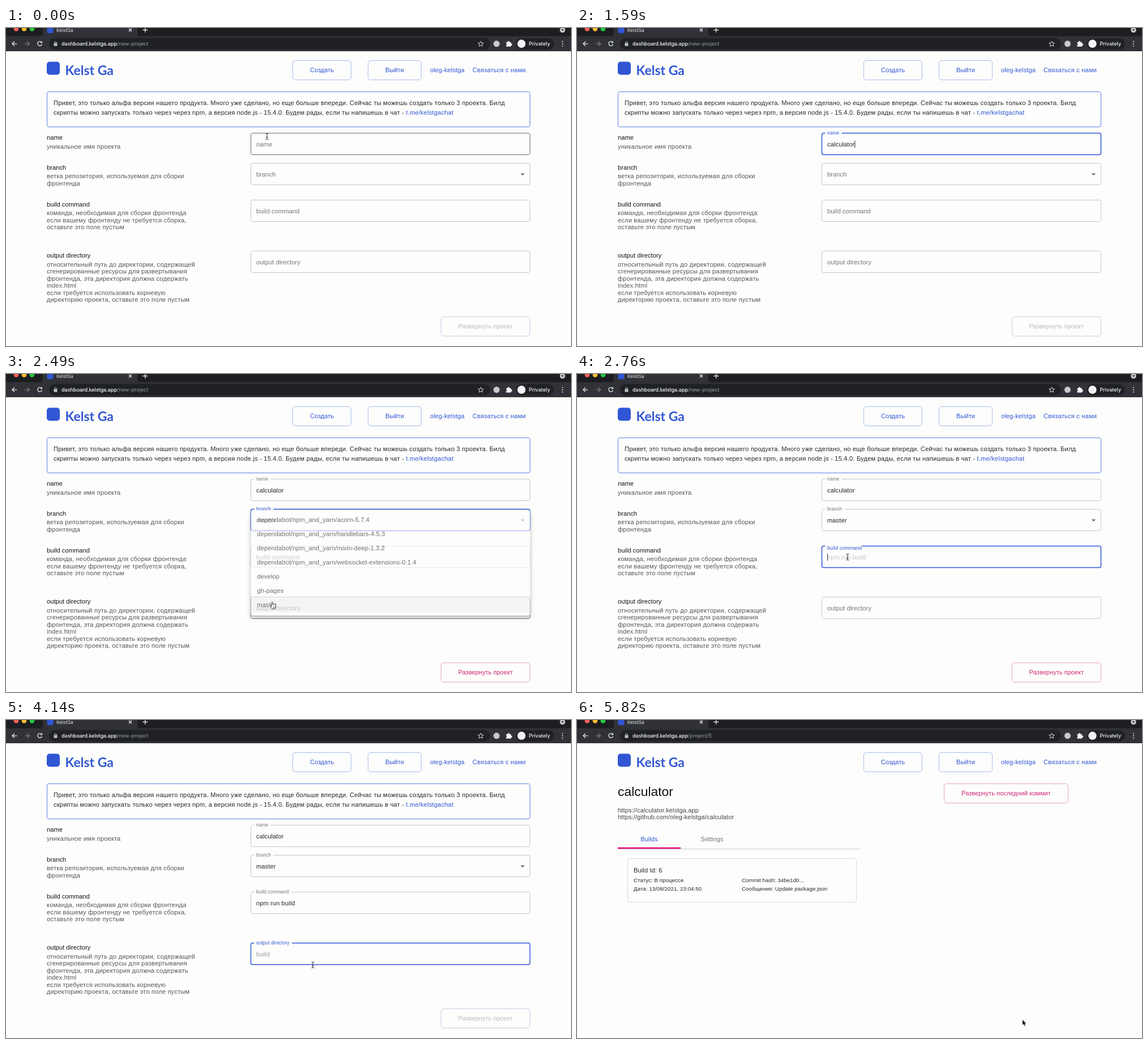
An HTML page for the animation above (5.85 s loop, 998 px wide and 561 px high).

```html
<!DOCTYPE html>
<html lang="ru">
<head>
<meta charset="utf-8">
<title>KelstGa</title>
<style>
  html, body { margin: 0; width: 100%; height: 100%; overflow: hidden; background: #fdfdfc; }
  svg { display: block; width: 998px; height: 561px; }
  text { font-family: "Liberation Sans", Arial, sans-serif; font-size: 11.1px; white-space: pre; }
  .ui { font-family: Inter, Roboto, sans-serif; }
</style>
</head>
<body>
<svg viewBox="0 0 998 561" xmlns="http://www.w3.org/2000/svg">
  <g id="browser"></g>
  <g id="header"></g>
  <g id="page"></g>
  <g id="overlay"></g>
</svg>
<script>
const LOOP = 5850;
const BLUE = '#3156d4', INK = '#262626', GREY = '#757575', PINK = '#cc2a74', BG = '#fdfdfc';
const TAB_BAR = '#1c1e21', TOOLBAR = '#303237', PILL = '#1f2124';
const FOCUS_MS = 100, BLINK = 265;

const $ = id => document.getElementById(id);
const clamp = v => Math.max(0, Math.min(1, v));
const easeOut = v => 1 - (1 - clamp(v)) ** 3;
const easeInOut = v => { v = clamp(v); return v * v * (3 - 2 * v); };
const lerp = (a, b, p) => a + (b - a) * p;

const pen = document.createElement('canvas').getContext('2d');
pen.font = '11.1px "Liberation Sans", Arial, sans-serif';
const widthOf = s => pen.measureText(s).width + s.length * 0.1;

// SVG string helpers
function text(x, y, s, { fill = INK, size = 11.1, gap = 0.1, more = '' } = {}) {
  return `<text x="${x}" y="${y}" fill="${fill}" style="font-size:${size}px;letter-spacing:${gap}px" ${more}>${s}</text>`;
}
function box(x, y, w, h, r, stroke, fill = 'none', width = 1) {
  return `<rect x="${x}" y="${y}" width="${w}" height="${h}" rx="${r}" fill="${fill}" stroke="${stroke}" stroke-width="${width}"/>`;
}
const path = (d, attrs) => `<path d="${d}" ${attrs}/>`;
const dot = (x, y, r, fill) => `<circle cx="${x}" cy="${y}" r="${r}" fill="${fill}"/>`;
function button(x, y, w, label, color, border, fill) {
  return box(x, y, w, 34, 4.5, border, fill) +
    text(x + w / 2, y + 20.6, label, { fill: color, gap: 0, more: 'text-anchor="middle"' });
}

function drawBrowser(address) {
  const ui = { gap: 0, more: 'class="ui"' };
  const line = 'fill="none" stroke="#e8eaed" stroke-width="1.3"';
  return `<rect width="998" height="41" fill="${TOOLBAR}"/>
    <rect width="998" height="14.5" fill="${TAB_BAR}"/>
    <path d="M60 14.5Q65 14.5 65 9V0H232V9Q232 14.5 237 14.5Z" fill="${TOOLBAR}"/>` +
    dot(18, 1.5, 4.3, '#fe5f57') + dot(32, 1.5, 4.3, '#febc2e') + dot(46, 1.5, 4.3, '#28c840') +
    '<rect x="72.5" y="-2" width="11" height="11" rx="2" fill="#3156d4"/>' +
    text(89, 6.6, 'KelstGa', { ...ui, fill: '#e8eaed', size: 8.2 }) +
    path('M217 1l5 5m0-5l-5 5', line) + path('M245.8-1v9m-4.5-4.5h9', line) +
    dot(983, 3.5, 4.8, '#c4c6c9') + path('M980.6 2.3h4.8l-2.4 3z', `fill="${TOOLBAR}"`) +
    `<rect x="76" y="17.5" width="779" height="20.5" rx="10.2" fill="${PILL}"/>
    <rect x="901" y="18" width="67" height="20" rx="10" fill="${PILL}"/>` +
    path('M19.5 27.8h-8.5m4-4l-4 4l4 4', line) +
    path('M33 27.8h8.5m-4-4l4 4l-4 4', line + ' opacity=".4"') +
    path('M62.9 25.2a3.9 3.9 0 1 0 .6 3.5', line) + path('M64 22.8v3.8h-3.8z', 'fill="#e8eaed"') +
    path('M85.5 27h4v-1a2 2 0 0 0-4 0z', 'fill="none" stroke="#bdc1c6"') +
    '<rect x="84.5" y="27" width="6" height="4.8" rx=".6" fill="#bdc1c6"/>' +
    text(98, 31, `<tspan fill="#f1f3f4" stroke="#f1f3f4" stroke-width=".2">dashboard.kelstga.app</tspan>${address}`,
      { ...ui, fill: '#9aa0a6', size: 9.1 }) +
    path('M838.6 23.2l1.4 3.1l3.4.3l-2.6 2.3l.8 3.3l-3-1.8l-3 1.8l.8-3.3l-2.6-2.3l3.4-.3z',
      'fill="none" stroke="#dadce0"') +
    dot(866.5, 27.8, 5.5, '#c8cacd') +
    path('M883.5 25h2.5a1.7 1.7 0 1 1 3.3 0h2.7v2.5a1.7 1.7 0 1 1 0 3.3v2h-8.5v-2.7a1.6 1.6 0 0 0 0-3z', 'fill="#f1f3f4"') +
    dot(910.5, 27.8, 7.2, '#f1f3f4') +
    text(923.5, 31, 'Privately', { ...ui, fill: '#f1f3f4', size: 9, more: 'class="ui" font-weight="500"' }) +
    dot(983, 23.8, 1, '#e8eaed') + dot(983, 27.8, 1, '#e8eaed') + dot(983, 31.8, 1, '#e8eaed');
}

function drawHeader() {
  return '<rect x="72" y="59.5" width="23" height="23" rx="5" fill="#3156d4"/>' +
    `<text x="104.5" y="83" fill="${BLUE}" font-weight="700" style="font-family:Lato,sans-serif;font-size:23px">Kelst Ga</text>` +
    button(506.5, 57.5, 103, 'Создать', BLUE, '#a9bcec') +
    button(639.5, 57.5, 94, 'Выйти', BLUE, '#a9bcec') +
    text(749, 78.3, 'oleg-kelstga', { fill: BLUE }) +
    text(824, 78.3, 'Связаться с нами', { fill: BLUE, gap: 0.19 });
}

const HELP = [
  [197.4, 'name', ['уникальное имя проекта']],
  [250, 'branch', ['ветка репозитория, используемая для сборки', 'фронтенда']],
  [315, 'build command', ['команда, необходимая для сборки фронтенда',
    'если вашему фронтенду не требуется сборка,', 'оставьте это поле пустым']],
  [405.3, 'output directory', ['относительный путь до директории, содержащей',
    'сгенерированные ресурсы для развертывания', 'фронтенда, эта директория должна содержать',
    'index.html', 'если требуется использовать корневую', 'директорию проекта, оставьте это поле пустым']],
];

function drawFormText() {
  const info = { gap: 0.2 };
  return box(72.5, 112.5, 853, 62, 3, '#5f7fe2') +
    text(84, 135.8, 'Привет, это только альфа версия нашего продукта. Много уже сделано, но еще больше впереди. Сейчас ты можешь создать только 3 проекта. Билд', info) +
    text(84, 152.5, `скрипты можно запускать только через через npm, а версия node.js - 15.4.0. Будем рады, если ты напишешь в чат - <tspan fill="${BLUE}">t.me/kelstgachat</tspan>`, info) +
    HELP.map(([y, title, lines]) => text(72, y, title, { fill: '#111', gap: 0.05 }) +
      lines.map((s, i) => text(72, y + 15.3 + i * 12.5, s, { fill: '#555', gap: 0.18 })).join('')).join('');
}

const FIELDS = [
  { label: 'name', y: 185.5, focus: 180, blur: 1990, value: 'calculator', type: [420, 1400] },
  { label: 'branch', y: 238.5, focus: 1990, blur: 2720, value: 'master', type: [2460, 2460], select: true },
  { label: 'build command', y: 303.5, focus: 2720, blur: 3850, value: 'npm run build', type: [2950, 3650], hint: 'npm run build' },
  { label: 'output directory', y: 393.5, focus: 3850, blur: 4900, value: 'build', type: [4280, 4600], hint: 'build' },
];

function typed({ value, type: [start, end] }, t) {
  if (t < start) return '';
  return start === end ? value : value.slice(0, 1 + Math.floor(clamp((t - start) / (end - start)) * (value.length - 1)));
}

function drawField(f, t, hovered) {
  const { y, label } = f;
  const focused = t >= f.focus && t < f.blur;
  const shrink = easeOut((t - f.focus) / FOCUS_MS);
  const value = typed(f, t);
  const color = focused ? BLUE : GREY;
  const border = focused ? BLUE : hovered ? '#6c6c6c' : '#c4c6c4';
  let out = box(432.5, y, 493, 38, 3, border, 'none', focused ? 1.5 : 1);
  if (shrink) {
    const notch = (widthOf(label) * 0.75 + 8) * clamp(shrink * 1.4);
    out += `<rect x="438.5" y="${y - 1.5}" width="${notch}" height="3" fill="${BG}"/>`;
  }
  out += `<g transform="translate(442 ${lerp(y + 23.2, y + 2.8, shrink)}) scale(${lerp(1, 0.75, shrink)})">${text(0, 0, label, { fill: color })}</g>`;
  if (value) out += text(442, y + 23.2, value);
  else if (f.hint && focused) out += text(442, y + 23.2, f.hint, { fill: '#222', more: `opacity="${0.45 * clamp((t - f.focus) / 70)}"` });
  if (focused && !f.select) {
    const [start, end] = f.type;
    const since = t < start ? t - f.focus : Math.max(0, t - end);
    if (Math.floor(since / BLINK) % 2 === 0)
      out += `<rect x="${442 + widthOf(value)}" y="${y + 13}" width=".9" height="13" fill="#222"/>`;
  }
  if (f.select) out += path(`M909 ${y + 18}h7l-3.5 3.5z`, 'fill="#5c5c5c"');
  return out;
}

const MENU = { open: 2000, pick: 2460, y: 240, row: 25 };
const BRANCHES = ['dependabot/npm_and_yarn/acorn-5.7.4', 'dependabot/npm_and_yarn/handlebars-4.5.3',
  'dependabot/npm_and_yarn/mixin-deep-1.3.2', 'dependabot/npm_and_yarn/websocket-extensions-0.1.4',
  'develop', 'gh-pages', 'master'];

function drawMenu(t, pointerY) {
  const grow = easeOut((t - MENU.open) / 130);
  const opacity = grow * (1 - clamp((t - MENU.pick) / 90));
  if (!opacity) return '';
  const top = MENU.y + 5.5;
  const active = Math.max(0, Math.min(6, Math.floor((pointerY - 5 - top) / MENU.row)));
  return `<g opacity="${opacity}" transform="translate(679 258) scale(${lerp(0.75, 1, grow)} ${lerp(0.56, 1, grow)}) translate(-679 -258)">
    <rect x="432.5" y="${MENU.y}" width="493.5" height="186" rx="3" fill="#fdfdfd"
      style="filter:drop-shadow(0 3px 2px rgba(0,0,0,.25)) drop-shadow(0 3px 5px rgba(0,0,0,.24))"/>
    <rect x="432.5" y="${top + active * MENU.row}" width="493.5" height="25" fill="#f0f0ee"/>` +
    BRANCHES.map((s, i) => text(443.5, top + 15.9 + i * MENU.row, s)).join('') + '</g>';
}

const overDeploy = (x, y) => x > 769 && y > 509 && y < 544;

function drawForm(t, x, y) {
  const ready = t >= FIELDS[1].type[0] && (t < FIELDS[2].type[0] || t >= FIELDS[3].type[0]);
  return drawFormText() +
    FIELDS.map(f => drawField(f, t, x > 432 && y > f.y && y < f.y + 38 && pointerShown(t))).join('') +
    (ready ? button(768.5, 509.5, 157, 'Развернуть проект', PINK, '#e9a5c3', overDeploy(x, y) ? '#fbf2f6' : 'none')
           : button(768.5, 509.5, 157, 'Развернуть проект', '#bcbcbc', '#c6cde4'));
}

function drawProject() {
  const small = { size: 9.7, gap: 0.07 };
  return text(72, 134, 'calculator', { fill: '#111', size: 22.9, gap: 0 }) +
    button(648.5, 112.5, 219, 'Развернуть последний коммит', PINK, '#e9a5c3') +
    text(72, 162.7, 'https://calculator.kelstga.app', { fill: '#444' }) +
    text(72, 175.2, 'https://github.com/oleg-kelstga/calculator', { fill: '#444' }) +
    text(112.3, 214, 'Builds', { fill: BLUE, gap: 0 }) +
    text(218.3, 214, 'Settings', { fill: GREY, gap: 0 }) +
    '<rect x="72" y="227" width="427" height="1" fill="#c9c9c9"/><rect x="72" y="224.6" width="111" height="2.7" fill="#e0147f"/>' +
    box(89.5, 244.5, 404, 77, 4, '#d5d8e6') +
    text(100, 269.3, 'Build Id: 6') +
    text(100, 286, 'Статус: В процессе', small) +
    text(100, 300.6, 'Дата: 13/08/2021, 23:04:50', small) +
    text(291, 286, 'Commit hash: 34be1d0...', small) +
    text(291, 300.6, 'Сообщение: Update package.json', small);
}

// Pointer path: time, x, y
const PATH = [
  [0, 461, 191], [150, 468, 203], [1660, 468, 204], [1940, 480, 259], [2060, 480, 260], [2190, 479, 272],
  [2420, 472, 408], [2500, 472, 408], [2680, 478, 323], [3700, 478, 323], [3820, 536, 413],
  [4000, 538, 416], [4140, 542, 432], [4680, 545, 440], [4870, 673, 546], [4980, 673, 546],
  [5230, 792, 531], [5400, 792, 531], [5600, 789, 534],
];
const HIDDEN = [[420, 1660], [2950, 3700], [4280, 4680]];
const PAGE_CHANGE = 5420;
const pointerShown = t => !HIDDEN.some(([a, b]) => t >= a && t < b);

function pointerAt(t) {
  const i = PATH.findIndex(k => k[0] > t);
  if (i < 0) return PATH[PATH.length - 1].slice(1);
  const [t0, x0, y0] = PATH[i - 1], [t1, x1, y1] = PATH[i];
  const p = easeInOut((t - t0) / (t1 - t0));
  return [lerp(x0, x1, p), lerp(y0, y1, p)];
}

const POINTERS = {
  beam: path('M-2.5-5.5Q0-5.5 0-3.8Q0-5.5 2.5-5.5M0-4V4M-2.5 5.5Q0 5.5 0 3.8Q0 5.5 2.5 5.5M-1.5 1.5h3', 'fill="none" stroke="#333" stroke-width="1"'),
  hand: path('M-2.7 1.5V-4.6a1.1 1.1 0 0 1 2.2 0V-1.5q1-.8 1.8.1q1-.5 1.7.3q1.6-.3 1.6 1.4V3L3.4 6.5H-1.6L-4.7 2.2q-.6-1.5.7-1.5z', 'fill="#fff" stroke="#222" stroke-width=".9"') +
    path('M0 2.2v2.5m1.5-2.5v2.5m1.5-2.5v2.5', 'stroke="#222" stroke-width=".6"'),
  arrow: path('M-2-5V4L.1 2.1L1.5 5.4L3 4.7L1.6 1.6H4.4z', 'fill="#111" stroke="#fff" stroke-width=".7" paint-order="stroke"'),
};

function pointerKind(t, x, y) {
  if (t >= PAGE_CHANGE) return 'arrow';
  if (t >= MENU.open && t < MENU.pick + 60) return 'hand';
  if (overDeploy(x, y)) return 'hand';
  if (x < 432 || y > 433) return 'arrow';
  const f = FIELDS.find(f => y > f.y && y < f.y + 39);
  return !f ? 'arrow' : f.select ? 'hand' : 'beam';
}

function render(t) {
  const [x, y] = pointerAt(t);
  const done = t >= PAGE_CHANGE;
  const address = done ? '/project/5' : '/new-project';
  if ($('browser').dataset.address !== address) {
    $('browser').dataset.address = address;
    $('browser').innerHTML = drawBrowser(address);
  }
  $('page').innerHTML = done ? drawProject() : drawForm(t, x, y);
  $('overlay').innerHTML = drawMenu(t, y) +
    (pointerShown(t) ? `<g transform="translate(${x} ${y})">${POINTERS[pointerKind(t, x, y)]}</g>` : '');
}

$('header').innerHTML = drawHeader();
const began = performance.now();
function tick() {
  render((performance.now() - began) % LOOP);
  requestAnimationFrame(tick);
}
tick();
</script>
</body>
</html>
```
